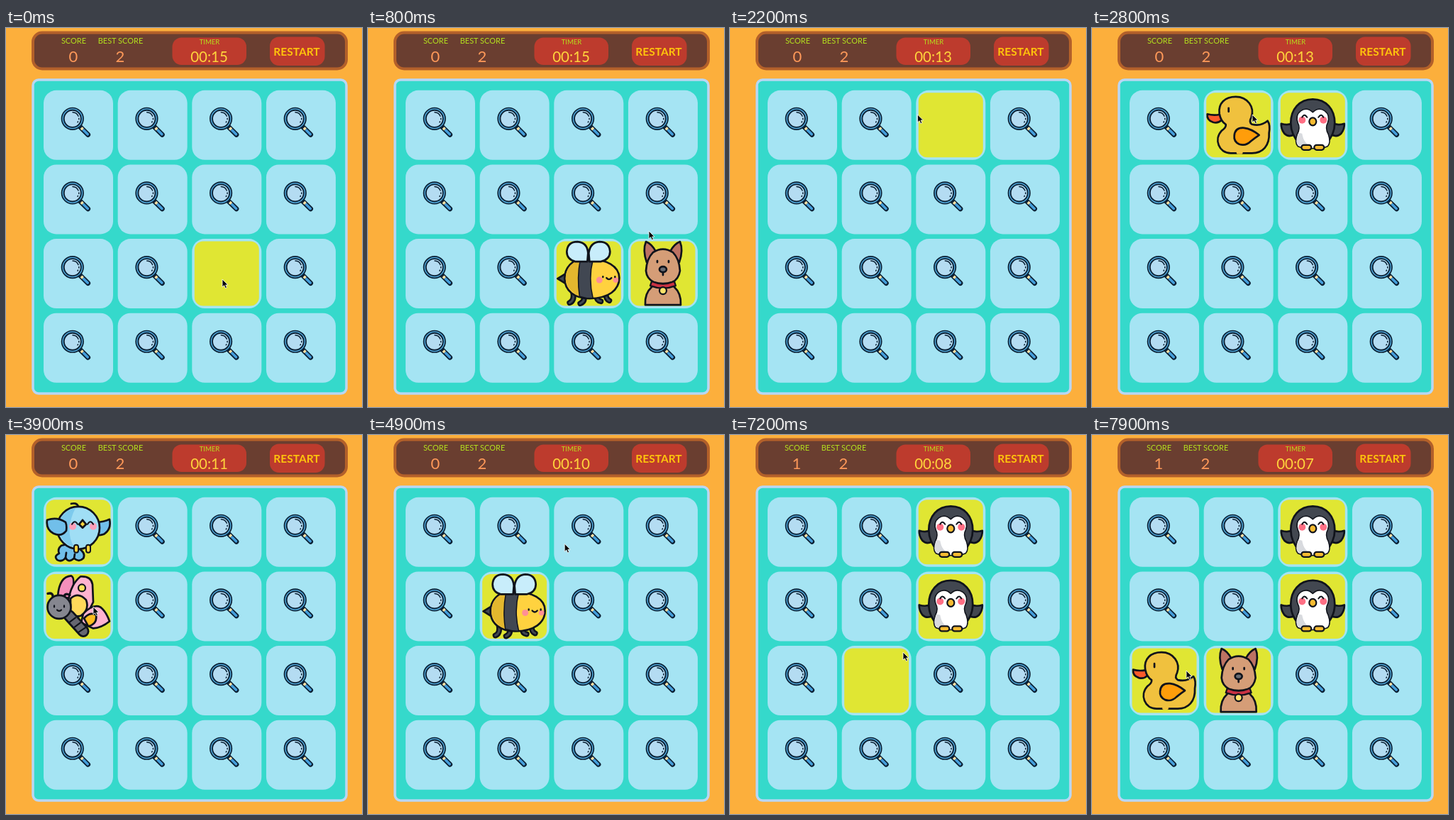
Animation, 502 px wide and 534 px high, one loop 8 s. Source, as an HTML page:

```html
<!DOCTYPE html>
<html lang="en">
<head>
<meta charset="utf-8">
<title>Memory game</title>
<style>
html, body { margin: 0; width: 100%; height: 100%; overflow: hidden; background: #fcaf3c; }
svg { display: block; width: 502px; height: 534px; }
text { font-family: "Comic Sans MS", Lato, sans-serif; text-anchor: middle; }
.label { font-size: 11px; fill: #b4e01e; }
.num { font-size: 22px; fill: #ff9959; }
.ink { stroke: #10131b; stroke-width: 2.7; stroke-linecap: round; stroke-linejoin: round; }
.line { fill: none; }
</style>
</head>
<body>
<svg viewBox="0 0 502 534">
<defs>
  <g id="lens">
    <path d="M50 50L62.6 62.4" stroke="#0b2034" stroke-width="7" stroke-linecap="round"/>
    <path d="M56.5 56.3L62.2 62" stroke="#459edb" stroke-width="3.6" stroke-linecap="round"/>
    <path d="M53 52.8L55.4 55.2" stroke="#ffe3a6" stroke-width="4"/>
    <circle cx="40.8" cy="40" r="13.6" fill="#b4dcf2" stroke="#0b2034" stroke-width="5"/>
    <circle cx="40.8" cy="40" r="13.7" fill="none" stroke="#4fa6d8" stroke-width="1.5"/>
    <path d="M41 31A9 9 0 0 1 49 36.5M49.8 39.5V41M48.5 44L48 45" fill="none" stroke="#0b2034" stroke-width="1.5" stroke-linecap="round"/>
  </g>

  <g id="bird" class="ink">
    <path d="M25 68Q19 73 22 79Q14 83 19 88Q26 92 31 85Q35 93 43 86Q50 92 56 86Q60 79 50 72L39 65Z" fill="#71bfea"/>
    <path d="M32 78L31 85M44 80L43 86" class="line"/>
    <path d="M66 34Q80 37 93 31Q96 45 85 52Q75 56 67 47Z" fill="#71bfea"/>
    <circle cx="49" cy="43" r="30" fill="#a0def5"/>
    <path d="M45 15A28 28 0 0 0 43 70Q29 47 45 15Z" fill="#7dcaed" stroke="none"/>
    <path d="M31 35Q19 27 5 32Q3 45 14 51Q25 56 32 47Q33 40 31 35Z" fill="#71bfea"/>
    <path d="M49 13Q47 7 39 9" class="line"/>
    <g fill="#fb9fb9" stroke="none"><circle cx="41" cy="41" r="5"/><circle cx="70" cy="41" r="5"/></g>
    <path d="M40 38Q44 31 48 38M62 38Q66 31 70 38" class="line" stroke-width="2"/>
    <path d="M55 32L60 38L55 43L50 38Z" fill="#ffd43e"/>
    <g fill="#ffd43e" stroke-width="2"><rect x="43" y="67" width="6" height="11" rx="3"/><rect x="60" y="67" width="6" height="11" rx="3"/></g>
  </g>

  <g id="penguin" class="ink">
    <path d="M22 46Q14 50 4.500 47Q4 54 9 61Q15 67 24 62ZM76 46Q84 50 93.500 47Q94 54 89 61Q83 67 74 62Z" fill="#424750"/>
    <path d="M49 12.500C30 12.500 18 27 18 46C18 61 25 70 31 76H67C73 70 80 61 80 46C80 27 68 12.500 49 12.500Z" fill="#424750"/>
    <path d="M49 31Q41 23 32 29Q24 35 28 46Q32 53 27 62Q23 74 28 79Q34 82 49 82Q64 82 70 79Q75 74 71 62Q66 53 70 46Q74 35 66 29Q57 23 49 31Z" fill="#fff" stroke-width="1.600"/>
    <path d="M29 60Q24 74 29 78Q36 81 50 81Q36 76 34 61Z" fill="#d8dade" stroke="none"/>
    <g fill="#ff6f85" stroke="none"><circle cx="34" cy="42" r="5"/><circle cx="64" cy="42" r="5"/></g>
    <path d="M34 38Q37 32 41 38M57 38Q61 32 64 38" class="line" stroke-width="2"/>
    <ellipse cx="49" cy="44" rx="5" ry="5.500" fill="#f7bb31" stroke-width="2.200"/>
    <g fill="#f7bb31" stroke-width="2.200"><rect x="33" y="77" width="14" height="7" rx="3.500"/><rect x="51" y="77" width="14" height="7" rx="3.500"/></g>
  </g>

  <g id="duck" class="ink">
    <path d="M23 34Q14 36 5 33.500Q4 42 13 45Q20 47 25 42Z" fill="#fb5a2b"/>
    <path d="M22 33C20 18 30 9 45 9C62 9 72 24 67 38Q63 45 68 48Q81 51 90 43Q94 49 92 60C93 78 83 88.500 68 88.500H38C21 88.500 14 69 25 57Q32 52 31 48Q24 44 22 33Z" fill="#f0c13e"/>
    <path d="M48 88H53" stroke="#f0c13e" stroke-width="4"/>
    <path d="M35 25V30" class="line"/>
    <path d="M43 64Q44 52 57 53Q67 54 78 63Q72 67 66 72Q59 79 50 76Q42 72 43 64Z" fill="#ff9d0a"/>
  </g>

  <g id="butterfly" class="ink">
    <path d="M20 35Q22 7 39 6Q46 9 38 38Z" fill="#f58fbb"/>
    <path d="M35 40Q39 17 52 7Q67 6 69 18L70 43L62 59L42 65Z" fill="#ffb3d0"/>
    <path d="M56 59Q70 45 80 50Q88 56 93 70Q82 79 70 80L53 72Z" fill="#ffb3d0"/>
    <path d="M38 38Q49 28 60 40Q65 53 53 62Q44 65 38 57Z" fill="#ffd95a"/>
    <path d="M57 66Q65 56 74 61Q76 74 63 77Z" fill="#ffbe20"/>
    <circle cx="54" cy="23" r="5" fill="#ffe35c" stroke-width="2.2"/>
    <path d="M36 62L56 84" class="line" stroke-width="17"/>
    <path d="M36 62L56 84" class="line" stroke="#666771" stroke-width="11.5"/>
    <path d="M37 71L45 65M44 78L52 72M50 85L59 79" class="line" stroke-width="2.2"/>
    <path d="M13 37Q14 29 6 31M29 37Q29 29 37 33" class="line" stroke-width="3.4"/>
    <circle cx="22" cy="50" r="16.5" fill="#85868f"/>
    <path d="M15 48V50M29 48V50M19 54Q22 57 25 54" class="line" stroke-width="2.2"/>
  </g>

  <g id="bee" class="ink">
    <path d="M18 48L5 56L18 64Z" fill="#414752"/>
    <path id="legs" d="M27 76Q29 87 22 90M42 80Q44 88 37 91M60 80Q60 87 66 88M73 77Q73 85 78 87" class="line" stroke-width="8"/>
    <path d="M27 76Q29 87 22 90M42 80Q44 88 37 91M60 80Q60 87 66 88M73 77Q73 85 78 87" class="line" stroke="#414752" stroke-width="3"/>
    <path d="M45 28C25 28 15 41 15 56C15 73 29 84 50 84C77 84 92 72 92 55C92 39 75 28 45 28Z" fill="#ffd23f"/>
    <path d="M35 30Q16 37 16.500 57Q18 73 38 82Z" fill="#e3b72e" stroke="none"/>
    <path d="M37 29H55Q48 56 55 84Q45 84 36 81Q32 55 37 29Z" fill="#414752" stroke-width="1.500"/>
    <path d="M47 32H30Q18 29 18 18Q19 4 33 4Q47 5 48 20ZM50 32H66Q79 29 79 18Q78 4 64 4Q51 5 49 20Z" fill="#c8edfb"/>
    <g fill="#ff8f95" stroke="none"><circle cx="64" cy="58" r="4.500"/><circle cx="87" cy="58" r="3.800"/></g>
    <path d="M69 53V54M86 53V54M74 55Q77.500 59 81 55" class="line" stroke-width="2.400"/>
  </g>

  <g id="dog" class="ink">
    <path d="M24 93Q23 77 33 68L35 58H63L65 68Q75 77 74 93Z" fill="#d59d77"/>
    <path d="M26 33Q20 16 25 4Q33 7 39 18ZM72 33Q78 16 73 4Q65 7 59 18Z" fill="#bd7263"/>
    <path d="M35 19Q49 10 63 19Q72 28 73 45Q71 57 62 61Q49 65 36 61Q26 56 25 45Q26 28 35 19Z" fill="#d59d77"/>
    <path d="M41 31V33M57 31V33M49 45V51" class="line"/>
    <ellipse cx="49" cy="43" rx="5" ry="4" fill="#686b73"/>
    <path d="M33 60Q49 67 65 60L67 66Q49 73 31 66Z" fill="#c93243" stroke-width="2.200"/>
    <circle cx="49" cy="73" r="5" fill="#ffe36b" stroke-width="2.200"/>
  </g>
</defs>

<rect x="38" y="6.500" width="442" height="51" rx="13" fill="#6a3e30" stroke="#b3602a" stroke-width="4"/>
<g id="scores">
  <text class="label" x="95.500" y="22">SCORE</text>
  <text class="label" x="161.500" y="22">BEST SCORE</text>
  <text class="num" id="score" x="95" y="48">0</text>
  <text class="num" x="161" y="48">2</text>
</g>
<rect x="234.500" y="13.500" width="104.500" height="38.500" rx="13" fill="#bd3b2d"/>
<text x="287" y="23" font-size="9.500" fill="#b4e01e">TIMER</text>
<text id="timer" x="286.500" y="47.500" font-size="20.500" fill="#ffd53c">00:15</text>
<rect x="372" y="12.500" width="77.500" height="40.500" rx="13" fill="#bd3b2d"/>
<text x="410" y="38.600" font-size="15.500" font-weight="bold" fill="#ffc40c">RESTART</text>
<rect x="38" y="73" width="442" height="442" rx="8" fill="#35d9cb" stroke="#b9d7f4" stroke-width="3.500"/>
<g id="board"></g>
<path id="cursor" d="M0 0V11L2.6 8.7L4.3 12.6L6.4 11.7L4.7 8H8Z" fill="#080808" stroke="#fff" stroke-width=".8"/>
</svg>
<script>
const LOOP = 8000, STEP = 100, REVEAL = 300, PITCH = 104.65;
const $ = id => document.getElementById(id);

// column, row, animal, opening time, closing time
const flips = [
  [2, 2, "bee", -150, 1100], [3, 2, "dog", 400, 1100],
  [3, 1, "bird", 1000, 2000], [3, 0, "butterfly", 1400, 2200],
  [2, 0, "penguin", 2000, 3200], [1, 0, "duck", 2400, 3200],
  [0, 0, "bird", 3100, 4300], [0, 1, "butterfly", 3500, 4300],
  [1, 1, "bee", 4600, 6200], [2, 0, "penguin", 5000, LOOP],
  [2, 1, "penguin", 5400, LOOP], [1, 2, "dog", 7200, LOOP],
  [0, 2, "duck", 7600, LOOP]
];

// time, x, y of the pointer tip
const path = [
  [0, 305, 354], [400, 386, 350], [600, 392, 336], [1000, 400, 236],
  [1400, 387, 108], [1600, 385, 108], [2000, 302, 122], [2400, 227, 122],
  [2800, 226, 122], [3100, 124, 138], [3500, 123, 242], [4200, 123, 242],
  [4600, 208, 236], [5000, 290, 138], [5400, 277.5, 205], [6400, 277.5, 205],
  [7200, 244, 306], [7600, 142, 332], [7900, 133, 332]
];

const cards = Array.from({ length: 16 }, (_, i) => {
  const g = document.createElementNS("http://www.w3.org/2000/svg", "g");
  const x = 53 + i % 4 * PITCH, y = 87.8 + (i >> 2) * PITCH;
  g.setAttribute("transform", `translate(${x} ${y})`);
  g.innerHTML = `<rect width="98" height="98" rx="18" fill="#a5e4f3"/>
    <rect x="3.5" y="3.5" width="91" height="91" rx="12" fill="#e0e633"/><use/>`;
  $("board").append(g);
  return { back: g.children[1], picture: g.children[2] };
});

function pointAt(t) {
  const n = path.findIndex(p => p[0] > t);
  if (n < 0) return path.at(-1).slice(1);
  const [a, b] = [path[n - 1], path[n]];
  const u = (t - a[0]) / (b[0] - a[0]), e = u * u * (3 - 2 * u);
  return [1, 2].map(k => a[k] + (b[k] - a[k]) * e);
}

function draw(now) {
  const t = Math.floor(now % LOOP / STEP) * STEP;
  cards.forEach(({ back, picture }, i) => {
    const flip = flips.find(([c, r, , from, to]) => r * 4 + c === i && t >= from && t < to);
    const shown = !flip ? "lens" : t - flip[3] < REVEAL ? "" : flip[2];
    back.style.display = flip ? "" : "none";
    picture.style.display = shown ? "" : "none";
    if (shown) picture.setAttribute("href", "#" + shown);
  });
  const scored = t >= 6300;
  $("score").textContent = +scored;
  $("scores").setAttribute("transform", `translate(${-scored} 0)`);
  $("timer").textContent = "00:" + String(15 - Math.floor((t + 100) / 1000)).padStart(2, "0");
  $("cursor").setAttribute("transform", `translate(${pointAt(t)})`);
}

const start = performance.now();
function tick() {
  draw(performance.now() - start);
  requestAnimationFrame(tick);
}
tick();
</script>
</body>
</html>
```
